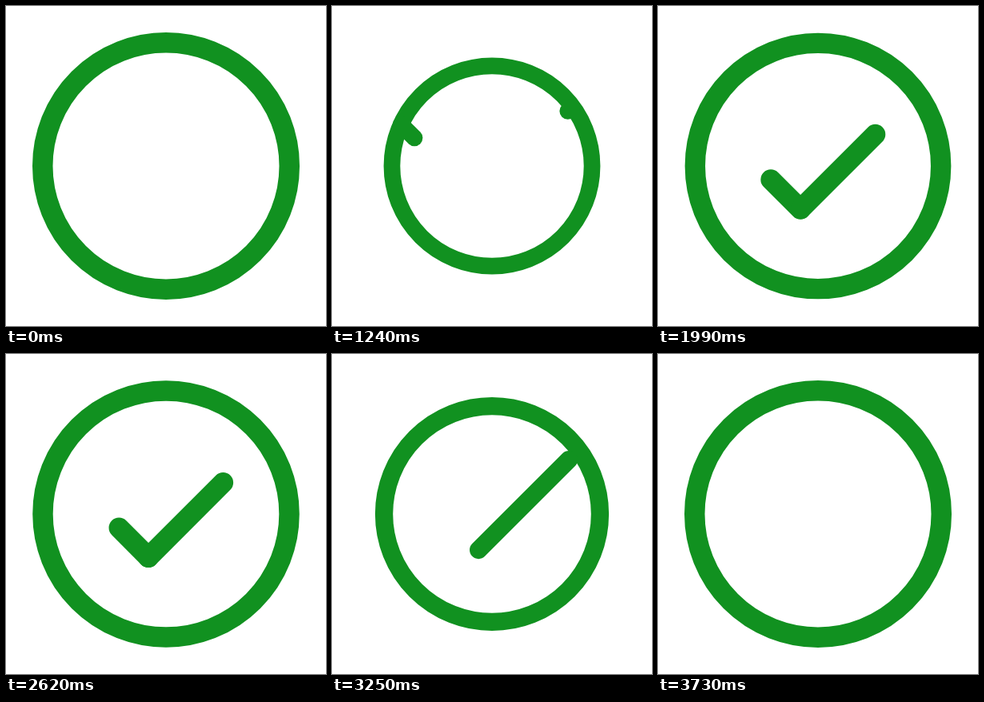
These frames come from a looping animation (400 px wide and 400 px high, 3.76 s). An HTML page with a canvas:

```html
<!DOCTYPE html>
<html lang="en">
<head>
<meta charset="utf-8">
<title>Check toggle</title>
<style>
  html, body { margin: 0; width: 100%; height: 100%; overflow: hidden; background: #fff; }
  canvas { display: block; width: 400px; height: 400px; }
</style>
</head>
<body>
<canvas width="400" height="400"></canvas>
<script>
const ctx = document.querySelector('canvas').getContext('2d');
const LOOP = 3760, STEP = 30, STEPS = 40;
const SHOW = 1000, HIDE = 2530;
// Arm lengths and distances from the corner to the ring, measured along x.
const SHORT = 37.2, LONG = 93.4, LEFT = 118.4, RIGHT = 145;

const clamp = x => Math.min(1, Math.max(0, x));
const progress = (t, start) => clamp(Math.floor((t - start) / STEP) / STEPS);

function ease(p, from, to) {
  const x = clamp((p - from) / (to - from));
  return x < 0.5 ? 4 * x ** 3 : 1 - 4 * (1 - x) ** 3;
}

const squeeze = p => p > 0 && p < 1 ? 1 - 905 * p ** 3.5 * Math.exp(-14.2 * p) : 1;

// Side -1 is the short left arm, side 1 the long right arm.
function arm(side, from, to) {
  ctx.beginPath();
  ctx.moveTo(178 + side * from, 254.2 - from);
  ctx.lineTo(178 + side * to, 254.2 - to);
  ctx.stroke();
}

function slideIn(p) {
  const short = LEFT * (1 - ease(p, 0.02, 0.53));
  const long = RIGHT * (1 - ease(p, 0, 0.91));
  arm(-1, short, Math.min(short + SHORT, LEFT));
  arm(1, long, Math.min(long + LONG, RIGHT));
}

function slideOut(p) {
  const cut = 40 * ease(p, 0, 0.565) + 142.2 * ease(p, 0.74, 1);
  if (cut < SHORT) arm(-1, 0, SHORT - cut);
  arm(1, Math.max(0, cut - SHORT), LONG + (RIGHT - LONG) * ease(p, 0, 1));
}

function draw(t) {
  const shown = progress(t, SHOW), hidden = progress(t, HIDE);
  const scale = squeeze(hidden > 0 ? 1 - hidden : shown);

  ctx.setTransform(1, 0, 0, 1, 0, 0);
  ctx.fillStyle = '#fff';
  ctx.fillRect(0, 0, 400, 400);
  ctx.translate(200, 200);
  ctx.scale(scale, scale);
  ctx.translate(-200, -200);

  ctx.strokeStyle = '#119120';
  ctx.lineWidth = 25.5;
  ctx.lineCap = 'round';
  ctx.beginPath();
  ctx.arc(200, 200, 154.25, 0, 2 * Math.PI);
  ctx.stroke();

  if (hidden > 0) {
    if (hidden < 1) slideOut(hidden);
  } else if (shown > 0) {
    slideIn(shown);
  }
}

const begin = performance.now();
function tick() {
  draw((performance.now() - begin) % LOOP);
  requestAnimationFrame(tick);
}
tick();
</script>
</body>
</html>
```
